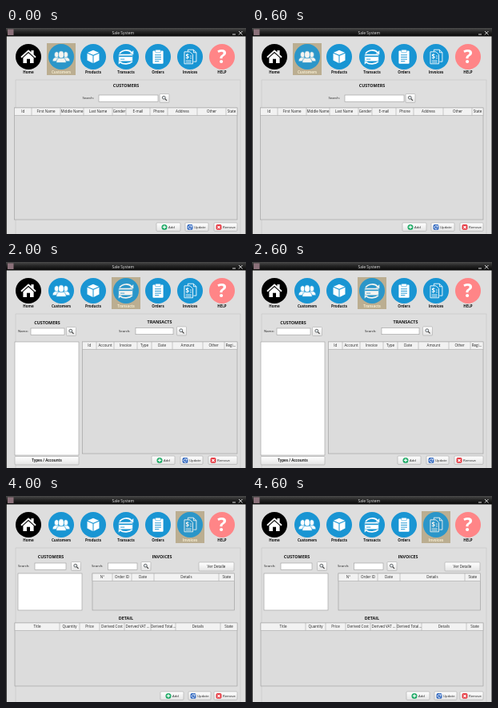
An HTML page that plays this animation: 300 by 258 pixels, repeating every 5000 ms.

```html
<!DOCTYPE html>
<html lang="en">
<head>
<meta charset="utf-8">
<title>Sale System</title>
<style>
html, body { margin: 0; width: 100%; height: 100%; overflow: hidden; background: #111; }
svg { display: block; width: 100vw; height: 100vh; }
text { font-family: "Open Sans", "Noto Sans", sans-serif; font-size: 4.5px; fill: #222; }
.b { font-weight: 700; }
.h { font-weight: 700; font-size: 5.4px; fill: #111; }
.s { font-size: 4.25px; }
.m { text-anchor: middle; }
</style>
</head>
<body>
<svg id="stage" viewBox="0 0 300 258">
  <defs>
    <linearGradient id="bar" x2="0" y2="1">
      <stop stop-color="#4a4a4a"/><stop offset=".45" stop-color="#252525"/><stop offset="1" stop-color="#080808"/>
    </linearGradient>
    <linearGradient id="btn" x2="0" y2="1">
      <stop stop-color="#fff"/><stop offset="1" stop-color="#e4e4e4"/>
    </linearGradient>
  </defs>
  <g id="view"></g>
</svg>
<script>
const BLUE = '#1995d3', GREY = '#dedede';

const rect = (x, y, x2, y2, fill, stroke = 'none', r = 0) =>
  `<rect x="${x}" y="${y}" width="${x2 - x}" height="${y2 - y}" rx="${r}" fill="${fill}" stroke="${stroke}" stroke-width=".6"/>`;
const text = (x, y, s, cls = '', extra = '') => `<text x="${x}" y="${y}" class="${cls}" ${extra}>${s}</text>`;
const mid = (x, y, s, cls = '', extra = '') => text(x, y, s, 'm ' + cls, extra);
const line = (d, color, w) => `<path d="${d}" fill="none" stroke="${color}" stroke-width="${w}"/>`;
const disc = (x, y, r, fill) => `<circle cx="${x}" cy="${y}" r="${r}" fill="${fill}"/>`;
const at = (x, y, s, k = 1) => `<g transform="translate(${x} ${y}) scale(${k})">${s}</g>`;

const person = (x, y, k) => at(x, y, `<g fill="#fff" stroke="${BLUE}" stroke-width=".8">
  <path d="M-7 8.500c0-5 2-6 5-7h4c3 1 5 2 5 7z"/><ellipse cy="-3" rx="3.9" ry="5.2"/></g>`, k);

// Toolbar icons, centred on the origin
const tools = [
  ['Home', 28, '#000', '<path d="M-11 0 0-10 4-6.4V-9h3.5v5.8L11 0 9.5 1.7 0-7-9.5 1.7zM-7.5 1.5 0-5.3 7.5 1.5V9H2.3V3h-4.6v6h-5.2z" fill="#fff"/>'],
  ['Customers', 69, BLUE, person(-6.5, -.5, .82) + person(6.5, -.5, .82) + person(0, 0, 1)],
  ['Products', 109, BLUE, '<path d="M0-9.5 8-6 0-2.5-8-6zM-8.5-4.8-.6-1.3V9L-8.5 5zM8.5-4.8.6-1.3V9L8.5 5z" fill="#fff"/>'],
  ['Transacts', 150, BLUE,
    line('M-9-4.500C-6-10 4-11 8-6M9 6.500C5 11-4 11-8 8', '#fff', 1.8) +
    '<path d="M10.500-9v6h-6zM-10.500 11V5.500h5.500z" fill="#fff"/>' +
    rect(-10.5, -4, 9.5, 6.5, '#fff', BLUE, 1.5) + rect(-10, -1.7, 9, .2, BLUE) + rect(-8, 3, -2, 4, BLUE)],
  ['Orders', 190, BLUE, rect(-7.5, -8.5, 7.5, 10, '#fff', 'none', 1.2) + rect(-3.8, -10, 3.8, -6, '#fff', BLUE, 1) +
    line('M-4.500-2.500h9M-4.500.500h9M-4.500 3.500h9M-4.500 6.500h6', BLUE, 1.1)],
  ['Invoices', 230, BLUE, line('M-3-7v-3H5L9-6V7H5M5-10v4h4', '#fff', 1) +
    '<path d="M-8-7h8l4 4V10H-8z" fill="' + BLUE + '" stroke="#fff"/>' +
    mid(-3.8, 3.5, '$', 'b', 'style="font-size:9px;fill:#fff"') +
    line('M0-1h2.500M0 2h2.500M-6 5.500h8M-6 7.800h8', '#fff', .9)],
  ['HELP', 270, '#ff8587', mid(0, 9.5, '?', 'b', 'style="font-size:27px;fill:#fff"')]
];

function toolbar(active) {
  return tools.map(([name, x, color, icon], i) => {
    const on = i === active;
    return (on ? rect(x - 18, 19, x + 18, 59, '#bbae91') : '') +
      disc(x, 36, 16, color) + at(x, 36, icon, .88) +
      (on ? disc(x, 36, 16, 'rgba(180,165,130,.12)') : '') +
      mid(x, 56.7, name, 'b', on ? 'style="fill:#f6ecd0"' : 'style="fill:#111"');
  }).join('');
}

const button = (x, x2, y, y2, label) =>
  rect(x, y, x2, y2, 'url(#btn)', '#aaa', 1) + mid((x + x2) / 2, (y + y2) / 2 + 1.7, label);
const wide = (x2, label) =>
  rect(11, 243.5, x2, 254, 'url(#btn)', '#aaa', 1) + mid((11 + x2) / 2, 250.4, label, 'b');

// Label, input box and magnifier button
const search = (x, label, x1, x2, bx, y = 88) =>
  text(x, y + 1.3, label, 's') + rect(x1, y - 4, x2, y + 4.2, '#fff', '#999') +
  rect(bx, y - 5.5, bx + 12, y + 5.5, 'url(#btn)', '#aaa', 1) +
  `<circle cx="${bx + 5.3}" cy="${y - .8}" r="1.9" fill="#e7f1f8" stroke="#444" stroke-width=".8"/>` +
  line(`M${bx + 6.8} ${y + .7}l2.200 2.200`, '#333', 1.1);

// cols: alternating label and right edge
function table(x, y, y2, cols) {
  const end = cols[cols.length - 1];
  let s = rect(x, y, end, y2, '#dcdcdc', '#999') + rect(x, y, end, y + 9.3, '#f2f2f2', '#aaa');
  for (let i = 0, left = x; i < cols.length; i += 2) {
    const right = cols[i + 1];
    s += mid((left + right) / 2, y + 6.3, cols[i]);
    if (right < end) s += line(`M${right} ${y}v9.300`, '#aaa', .6);
    left = right;
  }
  return s;
}

function actions(spans, y = 244) {
  const icons = [
    disc(0, 0, 3.7, '#22ab68') + line('M-2.200 0h4.400M0-2.200v4.400', '#fff', 1.2),
    rect(-3.6, -3.6, 3.6, 3.6, '#2862bd', 'none', 2) + line('M1.900-1A2.100 2.100 0 1 0 2 1M2.200-2.400v2H.2', '#fff', .9),
    rect(-3.6, -3.6, 3.6, 3.6, '#e5343d', 'none', 1.8) + line('M-1.700-1.700 1.700 1.700M1.700-1.700-1.700 1.700', '#fff', 1.2)
  ];
  return ['Add', 'Update', 'Remove'].map((name, i) => {
    const [x, x2] = spans[i];
    const pad = i ? 2 : 6;
    return rect(x, y, x2, y + 10.4, 'url(#btn)', '#aaa', 1) +
      at(x + pad + 4, y + 5.4, icons[i], .95) + text(x + pad + 9, y + 7, name, 's');
  }).join('');
}

const heading = (x, y, s) => mid(x, y + .7, s, 'h');
const list = (x, y, x2, y2) => rect(x, y, x2, y2, '#fff', '#999');

const pages = [
  heading(150, 73.5, 'CUSTOMERS') + search(95.5, 'Search:', 116, 190, 192) +
    table(10.5, 100, 240, ['Id', 32, 'First Name', 68, 'Middle Name', 97, 'Last Name', 133, 'Gender', 150,
      'E-mail', 180, 'Phone', 202, 'Address', 239, 'Other', 275, 'State', 289]) +
    actions([[188, 218], [224, 253], [260, 289]]),

  heading(56, 77.5, 'CATEGORIES') + search(15, 'Search:', 36, 75, 80.5) +
    heading(195, 77.5, 'PRODUCTS') + search(147.5, 'Search:', 168, 242, 246.5) +
    list(11, 101, 98, 241.5) + rect(103, 101, 289, 241.5, '#dcdcdc', '#999') +
    wide(98, 'Categories / Measures') + actions([[183, 217], [223, 252], [259, 288]]),

  heading(51.5, 77, 'CUSTOMERS') + search(15, 'Name:', 31, 73, 75.5, 87) +
    heading(192, 76.5, 'TRANSACTS') + search(141, 'Search:', 162, 209, 213.5, 86.5) +
    list(11, 100, 91, 242) +
    table(95.5, 100, 240, ['Id', 113, 'Account', 135, 'Invoice', 164, 'Type', 182, 'Date', 208,
      'Amount', 246, 'Other', 273, 'Regi...', 289]) +
    wide(91, 'Types / Accounts') + actions([[182, 211], [218, 246], [253, 289]], 243),

  heading(56, 77.5, 'CUSTOMERS') + search(15, 'Search:', 36, 75, 81) +
    heading(199, 77.5, 'ORDERS') + search(111, 'Search:', 133, 187, 193.5) +
    button(249, 285, 83, 94, 'Ver Items') + list(11, 100, 100, 242) +
    table(108, 101, 153, ['Id', 145, 'Date', 180, 'Total Amount', 217, 'Details', 253, 'State', 289]) +
    text(108, 165, 'Order ID:') + rect(133, 159, 186, 167, '#fff', '#999') +
    table(108, 173.5, 238, ['Item Id', 139, 'Product', 169, 'Quantity', 199, 'Item Cost', 229, 'Other', 259, 'State', 289]) +
    wide(100, 'Invoices') + actions([[179, 210], [216, 252], [258, 289]]),

  heading(56, 77.5, 'CUSTOMERS') + search(15, 'Search:', 36, 75, 81.5) +
    heading(195, 77.5, 'INVOICES') + search(107, 'Search:', 127.5, 164, 169) +
    button(241, 285, 83, 94, 'Ver Detalle') + list(15, 97, 95, 143) +
    table(108, 97, 143, ['N°', 133, 'Order ID', 157, 'Date', 185, 'Details', 266, 'State', 285.5]) +
    heading(150, 154.5, 'DETAIL') +
    table(11, 159, 238, ['Title', 67, 'Quantity', 92, 'Price', 117, 'Derived Cost', 148, 'Derived VAT ...', 181,
      'Derived Total...', 212, 'Details', 268, 'State', 289]) +
    actions([[193, 222], [228, 256], [260, 289]], 245)
];

const frame = rect(0, 0, 300, 258, '#111') + rect(0, 0, 300, 10.5, 'url(#bar)') +
  rect(2, 1.5, 9.5, 9, '#8a7079') +
  mid(146.3, 8, 'Sale System', '', 'style="font-size:5px;fill:#e8e8e8"') +
  line('M283 8h4M291 4l4.500 4.500M295.500 4l-4.500 4.500', '#ddd', 1) +
  rect(.8, 10.5, 299.5, 258, GREY) + rect(12, 65, 293, 262, GREY, '#c3c3c3');

const view = document.getElementById('view');
let shown = -1;

function draw(now) {
  const page = Math.floor(now / 1000) % pages.length;
  if (page !== shown) {
    shown = page;
    view.innerHTML = frame + toolbar(page + 1) + pages[page];
  }
  requestAnimationFrame(draw);
}
draw(performance.now());
</script>
</body>
</html>
```
